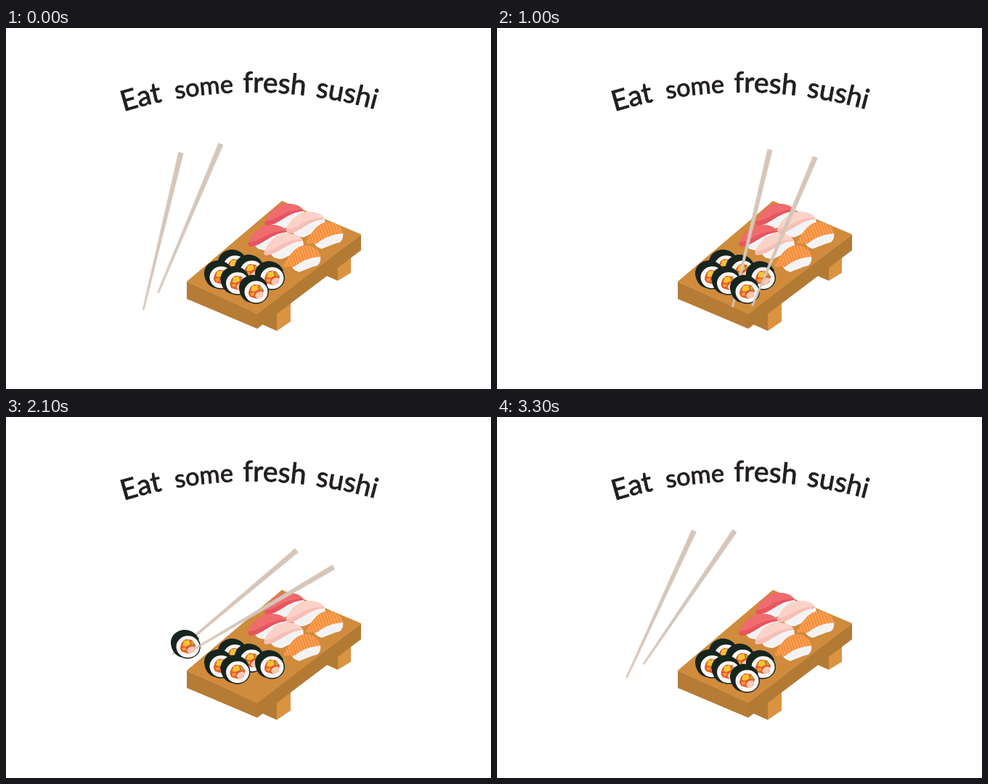
These frames come from a looping animation (668x497 px, 3.5 s). An HTML page:

```html
<!DOCTYPE html>
<html lang="en">
<head>
<meta charset="utf-8">
<title>Fresh sushi</title>
<style>
  html, body { margin: 0; width: 100%; height: 100%; overflow: hidden; background: #fff; }
  svg { display: block; width: 668px; height: 497px; }
  text { font: 37px Lato, "Open Sans", sans-serif; fill: #231f20; stroke: #231f20; stroke-width: .9px; }

  /* Hard steps there and back, with a longer rest at the far end */
  .left, .right, .lifted { animation: 3500ms step-end infinite; }
  .left { animation-name: left; }
  .right { animation-name: right; }
  .lifted { animation-name: lift; }

  @keyframes left {
    0%, 100%         { transform: translate(241px, 171.5px) rotate(13.5deg); }
    5.714%, 94.285%  { transform: translate(271.5px, 156.5px) rotate(24.7deg); }
    11.428%, 88.571% { transform: translate(326px, 177px) rotate(37.5deg); }
    17.142%, 82.857% { transform: translate(430px, 190.5px) rotate(50deg); }
    22.857%, 77.142% { transform: translate(482px, 231.5px) rotate(50deg); }
    28.571%, 71.428% { transform: translate(376px, 167.5px) rotate(13.4deg); }
    34.285%, 65.714% { transform: translate(339px, 102.5px) rotate(13.4deg); }
    40%, 60%         { transform: translate(400.5px, 183.5px) rotate(50deg); }
    45.714%          { transform: translate(353.5px, 148.5px) rotate(50deg); }
  }
  @keyframes right {
    0%, 100%         { transform: translate(296px, 159.5px) rotate(22.9deg); }
    5.714%, 94.285%  { transform: translate(327.5px, 156.5px) rotate(34.4deg); }
    11.428%, 88.571% { transform: translate(381px, 188px) rotate(47deg); }
    17.142%, 82.857% { transform: translate(481px, 213px) rotate(59.6deg); }
    22.857%, 77.142% { transform: translate(532.5px, 254px) rotate(59.6deg); }
    28.571%, 71.428% { transform: translate(438.5px, 177.5px) rotate(23deg); }
    34.285%, 65.714% { transform: translate(401.5px, 112.5px) rotate(23deg); }
    40%, 60%         { transform: translate(451.5px, 206.5px) rotate(59.6deg); }
    45.714%          { transform: translate(404.5px, 171.5px) rotate(59.6deg); }
  }
  @keyframes lift {
    0%, 71.428%, 100% { transform: none; }
    34.285%, 65.714%  { transform: translate(-37px, -50px); }
    40%, 60%          { transform: translate(-94px, -47px); }
    45.714%           { transform: translate(-141px, -83px); }
  }
</style>
</head>
<body>
<svg viewBox="0 0 668 497">
  <defs>
    <path id="arc" d="M162 115Q337 62 520 115"/>
    <path id="stick" d="M-3.7 0H3.7L1.4 223H-1.2Z" fill="#d6c6b9"/>
    <path id="rice" d="M10 29C20 21 40 11 54 11C56 18 54 23 49 26C40 28 33 33 25 36C18 36 12 34 10 29Z" fill="#f4f3f4"/>
    <path id="slice" d="M0 28C4 16 16 1 31 1C42 1 50 4 54 11C43 12 35 16 27 21C19 26 11 31 2 31Z"/>
    <path id="shine" d="M1 25C6 14 17 1 31 1C41 1 49 3 53 9C41 9 29 13 21 18C14 22 8 25 1 25Z"/>
    <pattern id="stripes" width="4" height="4" patternUnits="userSpaceOnUse" patternTransform="rotate(-20)">
      <path d="M0 0H4V4H0Z" fill="#f58f3b"/>
      <path d="M0 0H1V4H0Z" fill="#f9b071"/>
    </pattern>

    <g id="tuna">
      <use href="#rice"/>
      <use href="#slice" fill="#e8545e"/>
      <use href="#shine" fill="#ef6b6e"/>
    </g>
    <g id="salmon">
      <use href="#rice"/>
      <use href="#slice" fill="#f6bfb5"/>
      <use href="#shine" fill="#fbd2c8"/>
    </g>
    <g id="shrimp">
      <path d="M12 30C24 20 40 15 51 16C52 23 50 26 47 29C38 31 30 35 22 38C16 36 13 34 12 30Z" fill="#f4f3f4"/>
      <path d="M0 30C6 16 18 1 30 1C40 1 49 7 52 17C40 17 25 22 15 31C10 29 4 32 0 30Z" fill="url(#stripes)"/>
    </g>

    <g id="roll">
      <path d="M-22 -3C-23 -13 -14 -22 -3 -22C6 -22 13 -17 17 -9L-7 16C-16 14 -21 6 -22 -3Z" fill="#17251f"/>
      <ellipse cx="1.3" cy="1" rx="17.7" ry="16.7" fill="#17251f"/>
      <ellipse cx="1.5" cy="1.3" rx="16" ry="15" fill="#faf8f5"/>
      <path d="M-9 4C-9 -1 -6 -8 -1 -9L7 -8L12 -1L10 8L3 11L-7 8Z" fill="#e4572f"/>
      <path d="M-4 -7L3 -8L5 -2L-1 1L-6 0Z" fill="#f1c62f"/>
      <path d="M-7 3L-1 2L-1 6L-5 7Z" fill="#f3a12f"/>
      <path d="M5 -7L8 -6L10 -1L7 -1Z" fill="#a9b23a"/>
      <path d="M0 7C1 2 7 -1 11 2C11 7 8 11 3 11Z" fill="#f8c9b4"/>
    </g>
  </defs>

  <text><textPath href="#arc" startOffset="0" font-size="39">Eat</textPath></text>
  <text><textPath href="#arc" startOffset="74" font-size="34">some</textPath></text>
  <text><textPath href="#arc" startOffset="167" font-size="39">fresh</textPath></text>
  <text><textPath href="#arc" startOffset="267" font-size="38">sushi</textPath></text>

  <!-- Board -->
  <path d="M346 392L373 380V417L346 405Z" fill="#b37a34"/>
  <path d="M373 390L392 376V404L373 417Z" fill="#da9340"/>
  <path d="M441 330L457 318V348L441 341Z" fill="#b37a34"/>
  <path d="M457 322L475 310V337L457 348Z" fill="#da9340"/>
  <path d="M249 349L346 393V414L249 373Z" fill="#b67b34"/>
  <path d="M346 393L489 284V306L346 414Z" fill="#b37a34"/>
  <path d="M249 349L380 238L489 284L346 394Z" fill="#d08b3c"/>

  <!-- Nigiri -->
  <use href="#tuna" x="356" y="241"/>
  <use href="#salmon" x="385" y="252"/>
  <use href="#shrimp" x="413" y="266"/>
  <use href="#tuna" x="333" y="270"/>
  <use href="#salmon" x="355" y="282"/>
  <use href="#shrimp" x="382" y="298"/>

  <!-- Rolls -->
  <use href="#roll" x="314" y="327"/>
  <use href="#roll" x="295" y="342"/>
  <use href="#roll" x="337" y="334"/>
  <use href="#roll" x="365" y="343"/>
  <use href="#roll" x="317.5" y="350"/>

  <!-- The lifted roll sits between the two chopsticks -->
  <g class="left"><use href="#stick"/></g>
  <g class="lifted"><use href="#roll" x="343" y="362"/></g>
  <g class="right"><use href="#stick"/></g>
</svg>
</body>
</html>
```
